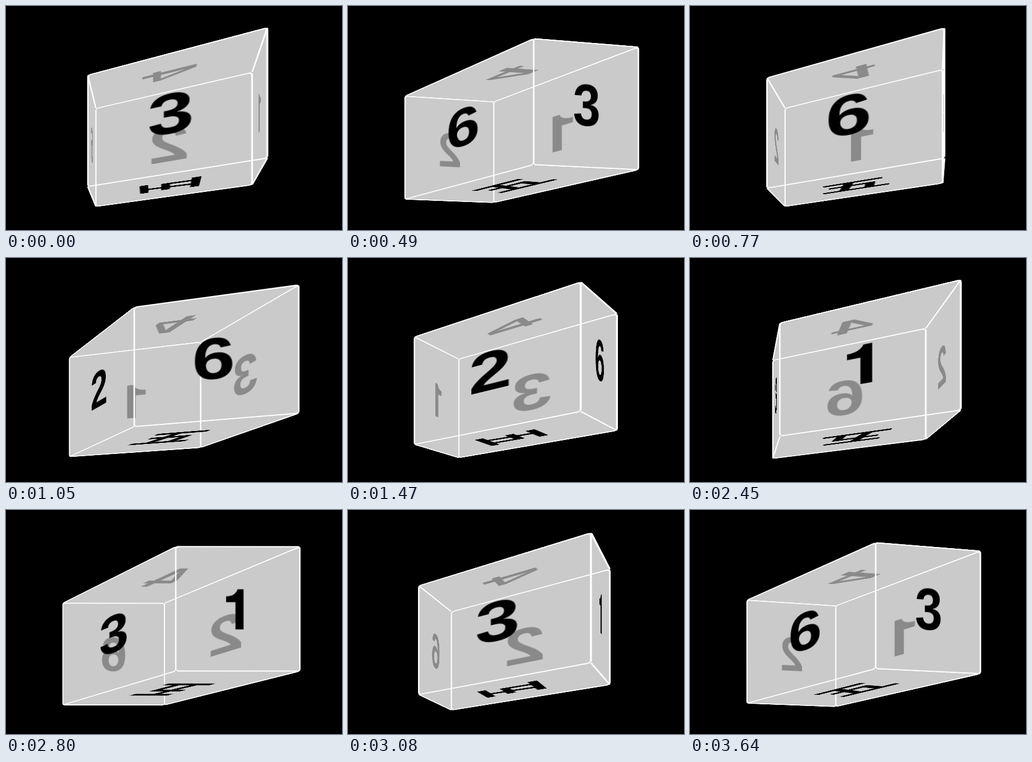
Write an HTML page that moves like this. It is 600 px wide and 400 px high and loops after 3710 ms.

```html
<!DOCTYPE html>
<html lang="zh">
<head>
<meta charset="utf-8">
<title>Rotating cube</title>
<style>
  html, body { margin: 0; width: 100%; height: 100%; overflow: hidden; background: #000; }
  .stage {
    position: relative; width: 600px; height: 400px; overflow: hidden;
    perspective: 1000px; perspective-origin: -805px 621px;
  }
  .cube {
    position: absolute; left: 192px; top: 121px; width: 200px; height: 200px;
    transform-style: preserve-3d;
  }
  .face {
    position: absolute; inset: -1px; box-sizing: border-box;
    border: 2px solid #fff; border-radius: 5px;
    background: rgba(255, 255, 255, .54); color: #000;
    font: bold 94px/200px "Liberation Sans", "Noto Sans CJK SC", sans-serif;
    text-align: center;
  }
  .face svg { position: absolute; left: -1px; top: -1px; }
  .front  { transform: translateZ(100px); }
  .right  { transform: rotateY(90deg) translateZ(100px); }
  .back   { transform: rotateY(180deg) translateZ(100px); }
  .left   { transform: rotateY(-90deg) translateZ(100px); }
  .top    { transform: rotateX(90deg) translateZ(100px); }
  .bottom { transform: rotateX(-90deg) translateZ(100px); font-size: 90px; }
</style>
</head>
<body>
<div class="stage">
  <div class="cube" id="cube">
    <div class="face front">6</div>
    <div class="face right">3</div>
    <div class="face back">
      <!-- numeral one without a foot -->
      <svg width="200" height="200" role="img" aria-label="1">
        <path transform="translate(74.7 133) scale(.091 -.091)"
          d="M378 0H235V482H69V584Q234 588 272 710H378Z"/>
      </svg>
    </div>
    <div class="face left">2</div>
    <div class="face top">4</div>
    <div class="face bottom">五</div>
  </div>
</div>
<script>
  const STEP = 70, STEPS = 53;
  // [step, degrees]: a nearly constant turn of 8 degrees per step
  const knots = [[0, -137], [7, -83], [15, -19], [27, 75], [35, 139], [44, 213], [52, 277]];
  const cube = document.getElementById('cube');

  function angleAt(step) {
    const i = Math.max(1, knots.findIndex(([s]) => s >= step));
    const [s0, a0] = knots[i - 1], [s1, a1] = knots[i];
    return a0 + (a1 - a0) * (step - s0) / (s1 - s0);
  }

  function draw() {
    const step = Math.floor(performance.now() / STEP) % STEPS;
    cube.style.transform = `rotateY(${angleAt(step)}deg)`;
    requestAnimationFrame(draw);
  }
  draw();
</script>
</body>
</html>
```
